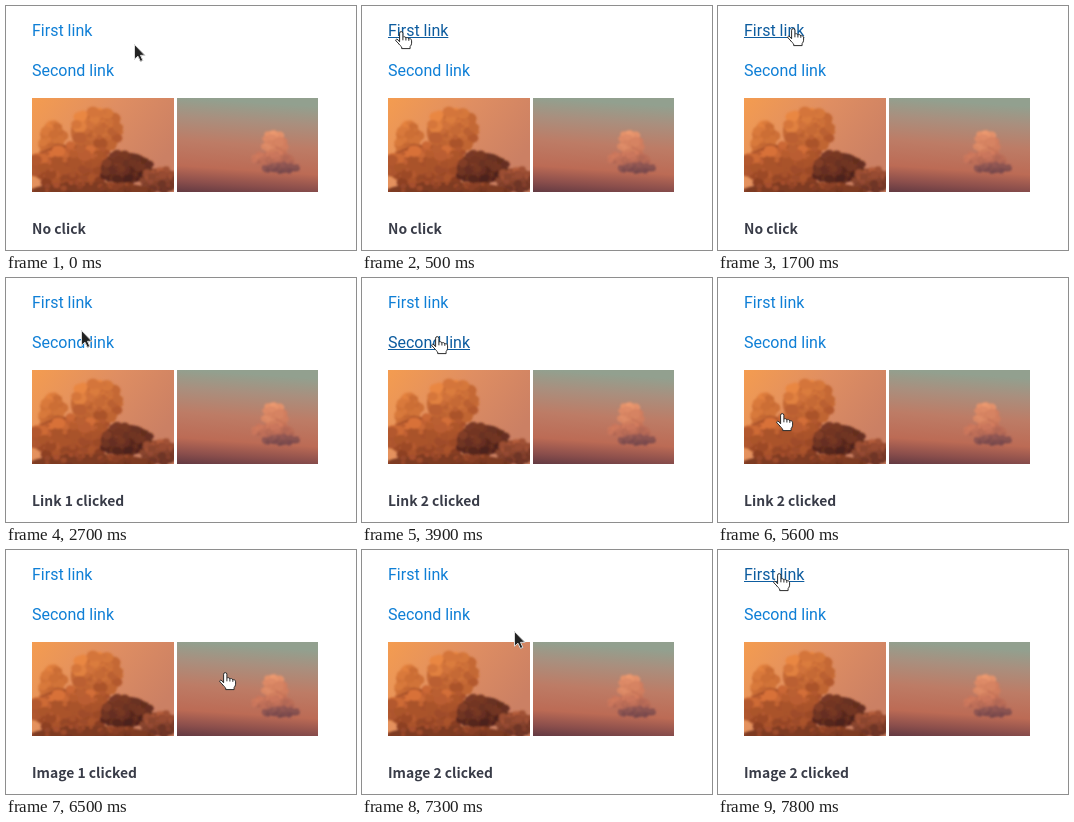
Animation, 350 px wide and 244 px high, one loop 8 s. Source, as an HTML page:

```html
<!DOCTYPE html>
<html lang="en">
<head>
<meta charset="utf-8">
<title>Clickable links and images</title>
<style>
  html, body { margin: 0; width: 100%; height: 100%; overflow: hidden; background: #fff; }
  svg { position: absolute; left: 0; top: 0; }
  .link { position: absolute; left: 26px; top: 15px; font: 16px/19px Roboto, sans-serif; color: #0f7fd6; }
  .link + .link { top: 55px; }
  .link.hover { color: #0d5c9f; text-decoration: underline; }
  #status {
    font: 700 13.9px "Noto Sans CJK JP", "Noto Sans CJK SC", "Noto Sans CJK", "Open Sans", sans-serif;
    fill: #393c48;
  }
  #arrow { filter: drop-shadow(0 0 .6px #777); }
</style>
</head>
<body>
<span class="link target">First link</span>
<span class="link target">Second link</span>

<svg width="350" height="244" viewBox="0 0 350 244">
  <defs>
    <linearGradient id="sunset" x1="0" y1="0" x2="1" y2="0.5">
      <stop offset="0" stop-color="#f49c50"/>
      <stop offset="0.5" stop-color="#df8e62"/>
      <stop offset="1" stop-color="#cb8064"/>
    </linearGradient>
    <linearGradient id="dusk" x1="0.1" y1="0" x2="0" y2="1">
      <stop offset="0" stop-color="#92a08f"/>
      <stop offset="0.2" stop-color="#a98f7e"/>
      <stop offset="0.45" stop-color="#bd7c66"/>
      <stop offset="0.72" stop-color="#bc6b55"/>
      <stop offset="0.88" stop-color="#8c4f4c"/>
      <stop offset="1" stop-color="#633a42"/>
    </linearGradient>
    <filter id="soft"><feGaussianBlur stdDeviation="0.9"/></filter>
  </defs>

  <svg x="26" y="92" width="142" height="94">
    <rect class="target" width="142" height="94" fill="url(#sunset)"/>
    <g id="tower" filter="url(#soft)"></g>
  </svg>
  <svg x="171" y="92" width="141" height="94">
    <rect class="target" width="141" height="94" fill="url(#dusk)"/>
    <g id="peak" filter="url(#soft)"></g>
  </svg>

  <text id="status" x="26" y="228"></text>

  <path id="arrow" d="M.5 .5V15.2L4 12.2 6.4 17.4 8.8 16.4 6.5 11.3H10.8Z"
    fill="#222" stroke="#fff" stroke-width=".8" stroke-linejoin="round"/>
  <g id="hand" stroke="#2a2a2a">
    <path d="M-1.4 9.8V1.2Q-1.3 -.4 .2 -.4 1.8 -.4 1.9 1.2V5.4Q2.2 4.6 3.4 4.7 4.8 4.9 4.9 6.2
      5.2 5.4 6.4 5.6 7.7 5.8 7.8 7.1 8.2 6.5 9.3 6.8 10.7 7.2 10.6 8.8
      V11.2Q10.4 13.2 9.1 14.6V16.6H.7V15Q-1.4 13.2 -3 10.9 -4.2 9.7 -5.2 8.9
      -5.6 7.6 -4.4 7.2 -3.1 7 -1.4 9.8Z" fill="#fff" stroke-linejoin="round"/>
    <path d="M1.9 5.5V8.3M4.9 6.2V8.5M7.8 7.2V8.8" fill="none"/>
  </g>
</svg>

<script>
const LOOP = 8000, STEP = 100;
const byId = id => document.getElementById(id);

let seed = 7;
const random = () => (seed = seed * 16807 % 2147483647) / 2147483647;

function puff(id, cx, cy, rx, ry, fill) {
  const e = document.createElementNS('http://www.w3.org/2000/svg', 'ellipse');
  for (const [k, v] of Object.entries({ cx, cy, rx, ry })) e.setAttribute(k, v);
  e.style.fill = fill;
  byId(id).append(e);
}

// a mound of random puffs, lit from the upper left
function heap(id, x, y, rx, ry, light, dark) {
  const tone = s => `color-mix(in srgb, ${dark} ${Math.max(0, Math.min(100, s * 100))}%, ${light})`;
  puff(id, x, y, rx * 0.9, ry * 0.9, tone(0.5));
  for (let i = 0; i < 70; i++) {
    const angle = random() * 2 * Math.PI, far = Math.sqrt(random()) * 0.9;
    const dx = far * Math.cos(angle), dy = far * Math.sin(angle);
    const size = 1.2 + ry * 0.2 * random();
    puff(id, x + dx * rx, y + dy * ry, size * 1.2, size, tone(0.45 + dx * 0.15 + dy * 0.4 + (random() - 0.5) * 0.4));
  }
}

heap('tower', 64, 34, 28, 24, '#e98743', '#a04a27');
heap('tower', 21, 44, 12, 20, '#e5833f', '#a24c28');
heap('tower', 40, 68, 46, 24, '#d87138', '#7c3520');
heap('tower', 94, 70, 28, 17, '#8a4229', '#421c17');
heap('tower', 128, 82, 20, 13, '#b35c3a', '#5a2820');
heap('tower', 60, 94, 70, 11, '#a8502d', '#522319');
heap('peak', 98, 47, 12, 15, '#ec9a70', '#bd6a52');
heap('peak', 97, 61, 22, 8, '#d98060', '#9d5a50');
heap('peak', 104, 70, 20, 5, '#9c5e56', '#6c4249');

// pointer moves: start, duration, x, y
const home = [128, 38];
const moves = [
  [0, 500, 39, 26], [1300, 100, 75, 23], [2400, 700, 75, 59],
  [4000, 700, 64, 136], [5700, 800, 219, 123], [7200, 600, 61, 24]
];
const clicks = [2000, 3800, 5700, 6800];
const targets = [...document.querySelectorAll('.target')];
const areas = targets.map(e => e.getBoundingClientRect());
const easeOut = p => 1 - (1 - p) ** 3;

function pointer(t) {
  let [x, y] = home;
  for (const [start, duration, toX, toY] of moves) {
    const p = easeOut(Math.max(0, Math.min(1, (t - start) / duration)));
    x += (toX - x) * p;
    y += (toY - y) * p;
  }
  return [Math.round(x), Math.round(y)];
}

function message(t) {
  const n = clicks.filter(at => at <= t).length - 1;
  return n < 0 ? 'No click' : `${n < 2 ? 'Link' : 'Image'} ${n % 2 + 1} clicked`;
}

function draw(t) {
  const [x, y] = pointer(t);
  const over = areas.findIndex(a => x >= a.left && x < a.right && y >= a.top && y < a.bottom);
  targets.forEach((e, i) => e.classList.toggle('hover', i === over));
  for (const id of ['arrow', 'hand']) {
    byId(id).setAttribute('transform', `translate(${x} ${y})`);
    byId(id).style.display = (id === 'hand') === (over >= 0) ? '' : 'none';
  }
  byId('status').textContent = message(t);
}

const start = performance.now();
function tick() {
  const t = (performance.now() - start) % LOOP;
  draw(Math.floor(t / STEP) * STEP);
  requestAnimationFrame(tick);
}
tick();
</script>
</body>
</html>
```
